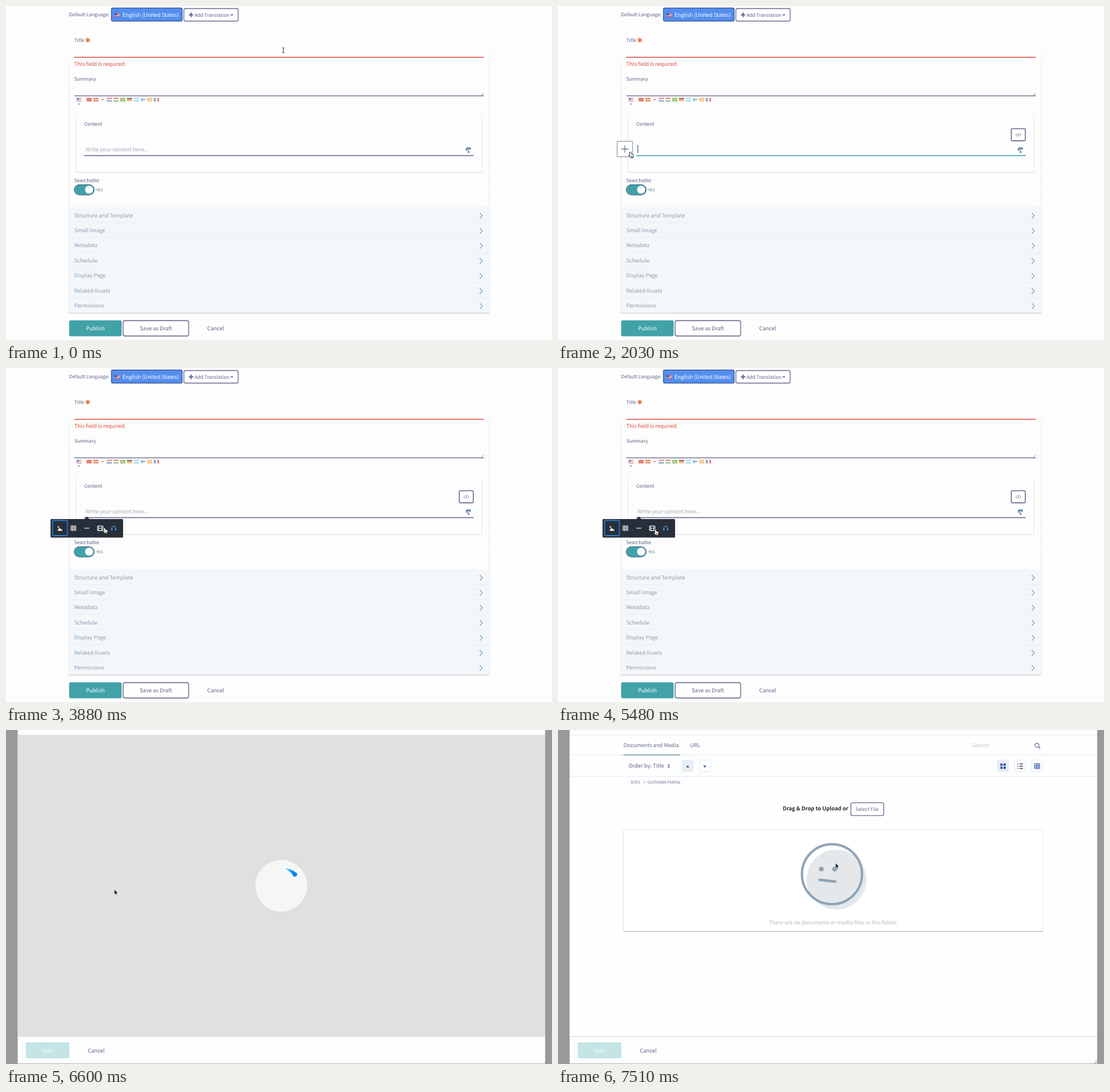
Write an HTML page that moves like this. It is 956 px wide and 586 px high and loops after 8000 ms.

```html
<!DOCTYPE html>
<html lang="en">
<head>
<meta charset="utf-8">
<title>Adding media to an article</title>
<style>
  html, body { margin: 0; width: 100%; height: 100%; overflow: hidden; background: #fdfdfe; }
  svg { display: block; width: 956px; height: 586px; }
  text {
    font-family: "Noto Sans CJK JP", "Noto Sans CJK SC", "Noto Sans CJK", "Noto Sans", sans-serif;
    text-rendering: geometricPrecision;
    white-space: pre;
  }
</style>
</head>
<body>
<svg id="stage" viewBox="0 0 956 586" fill="none"></svg>
<script>
const LOOP = 8000;
const BODY = 9.4, LABEL = 8.4;
const INK = '#5d5f85', MUTED = '#8b9dad', TEAL = '#41a2a8', BLUE = '#2f55a4';

const text = (x, y, s, fill = INK, size = BODY, extra = '') =>
  `<text x="${x}" y="${y}" font-size="${size}" fill="${fill}" ${extra}>${s}</text>`;
const centered = (x, y, s, fill, size) => text(x, y, s, fill, size, 'text-anchor="middle"');
const rect = (x, y, w, h, fill, stroke = 'none', rx = 0, sw = 1.3) =>
  `<rect x="${x}" y="${y}" width="${w}" height="${h}" fill="${fill}" stroke="${stroke}" stroke-width="${sw}" rx="${rx}"/>`;
const circle = (x, y, r, fill, extra = '') => `<circle cx="${x}" cy="${y}" r="${r}" fill="${fill}" ${extra}/>`;
const line = (d, stroke, sw = 1.3, extra = '') => `<path d="${d}" stroke="${stroke}" stroke-width="${sw}" ${extra}/>`;
const shape = (d, fill = 'currentColor') => `<path d="${d}" fill="${fill}"/>`;
const group = (id, content, extra = '') => `<g id="${id}" ${extra}>${content}</g>`;

// Flags: bands of colour, horizontal unless marked vertical.
function flag(x, y, colors, vertical) {
  const n = colors.length;
  return colors.map((c, i) => vertical
    ? rect(x + 9 * i / n, y, 9 / n, 6.5, c)
    : rect(x, y + 6.5 * i / n, 9, 6.5 / n, c)).join('');
}
const usFlag = (x, y) => flag(x, y, ['#d8424a', '#fff', '#d8424a', '#fff', '#d8424a']) + rect(x, y, 4.5, 3.8, '#3c5a9c');

function languageFlags() {
  const red = '#df3d30', yellow = '#f2bd36', blue = '#3568ac', sky = '#61bce8';
  const bands = [[red], [red, yellow, red], ['#fff'], [red, '#fff', blue], [red, '#fff', '#52a350'],
    ['#59aa3c'], ['#454545', red, yellow], [sky, '#fff', sky], ['#fff'], ['#f2a748', '#f5ba60', '#f2a748'],
    [blue, '#fff', red]];
  const row = bands.map((b, i) => flag(141 + 11.8 * i, 161, b, i === 10)).join('');
  return `<g opacity=".65">${usFlag(123.5, 161)}${row}
    ${circle(169.2, 164.2, 1.5, red)}${circle(204.5, 164.2, 1.9, yellow)}
    ${line('M235.5 164.2h9M238.5 161v6.5', blue, 1.5)}</g>${circle(127.5, 172, 1.3, '#319fd2')}`;
}

function accordion() {
  const titles = ['Structure and Template', 'Small Image', 'Metadata', 'Schedule',
    'Display Page', 'Related Assets', 'Permissions'];
  return rect(111, 353, 735, 185.5, '#f3f7fa') + titles.map((title, i) => {
    const y = 367 + 26.4 * i;
    return text(119.5, y + 3.5, title, MUTED)
      + line(`M829.5 ${y - 4}l4.5 5-4.5 5`, MUTED, 1.3)
      + (i ? line(`M111 ${y - 13.5}h735`, '#e9eef2', 1) : '');
  }).join('');
}

const form = `
  <defs><linearGradient id="edge" x2="0" y2="1"><stop stop-color="#e4e4ea" stop-opacity="0"/>
  <stop offset=".25" stop-color="#e4e4ea"/></linearGradient></defs>
  ${rect(0, 0, 956, 586, '#fdfdfe')}
  ${text(110.5, 18.3, 'Default Language:', INK, LABEL)}
  ${rect(184.5, 3.5, 124, 23, '#548eee', '#3d5c9c', 2.5)}${usFlag(190, 12.5)}
  ${text(204, 19, 'English (United States)', '#fff')}
  ${rect(311.5, 4.5, 95, 22, '#fff', '#66688f', 2.5)}
  ${line('M320 15.5h8M324 11.5v8', INK, 2)}
  ${text(330, 19, 'Add Translation', INK, LABEL)}${shape('M393 14.5h5l-2.5 3z', INK)}
  ${rect(110, 44, 1, 495, 'url(#edge)')}${rect(845.5, 44, 1, 495, 'url(#edge)')}
  ${text(119.5, 62.8, 'Title', INK, LABEL)}
  ${line('M143.2 55.8v8M139.7 57.8l7 4M139.7 61.8l7-4', '#e9733b', 2)}
  ${line('M119.5 90h717', '#df4a37', 1.4)}
  ${text(119.5, 104.6, 'This field is required.', '#df4a37')}
  ${text(119.5, 131, 'Summary', INK, LABEL)}
  ${line('M119.5 157.7h717', INK)}${line('M831.5 157l4.5-4.5M834 157l2-2', '#777', .7)}
  ${languageFlags()}
  ${rect(122.5, 180, 1, 112, 'url(#edge)')}${rect(833, 180, 1, 112, 'url(#edge)')}
  ${line('M123 292h710.5', '#d3d4da', 1.2)}
  ${text(137, 210.3, 'Content', INK, LABEL)}
  ${text(139.3, 255.4, 'Write your content here...', '#a5a7ba', BODY, 'id="placeholder"')}
  ${line('M137 262.5h682', INK, 1.4, 'id="underline"')}
  ${shape('M806.5 248h7.5v4h-7.5zM805 249h2v4h3.500v1.500h1v3.500h-3v-3.500h1v-.5h-4.500z', '#7891aa')}
  ${line('M139.8 244v14', '#333', 1, 'id="caret"')}
  ${text(119.5, 308.6, 'Searchable', INK, LABEL)}
  ${rect(119.5, 313.5, 35, 18, TEAL, '#557f94', 9)}${circle(145.5, 322.3, 7, '#fff')}
  ${text(158, 325, 'YES', INK, 6.6)}
  ${accordion()}
  ${line('M110.5 538.8h735.5', '#c9ccd2', 1.2)}
  ${rect(110.5, 551.500, 92, 28, TEAL, 'none', 3)}${centered(156.5, 569, 'Publish', '#fff')}
  ${rect(205.2, 552, 114.6, 27, '#fff', INK, 3)}${centered(262.5, 569, 'Save as Draft')}
  ${centered(367, 569, 'Cancel')}`;

const plusButton = rect(103.5, 237.5, 27, 27, '#fff', '#98a2b3', 1) + line('M110.5 251h13M117 244.500v13', '#64788e');
const codeButton = rect(793.6, 215.3, 24.6, 21.2, '#fff', '#4c4d78', 1.5)
  + line('M804 223.500l-2.500 2.500 2.500 2.500M808 223.500l2.500 2.500-2.500 2.500M806.700 223l-1.400 6', INK, .9);

const icons = [
  shape('M90 285.500l3.500-5.500 2 3 1-1 2.700 3.500z') + circle(91.7, 278.7, 1.3, 'currentColor'),
  rect(113.8, 277, 8.4, 8, 'none', 'currentColor', 0, 1) + line('M114 279.700h8M114 282.400h8M116.600 277v8M119.400 277v8', 'currentColor', .9),
  line('M137.300 281h8.500', 'currentColor', 1.2),
  rect(160.3, 277, 9.6, 8.4, 'none', 'currentColor', 1, 1.1) + line('M162.700 277v8.400M167.500 277v8.400M162.700 281.200h4.800M160.500 279.800h2M160.500 282.600h2M167.500 279.800h2M167.500 282.600h2', 'currentColor', .9),
  line('M185 282.500v-1a3.600 3.800 0 0 1 7.200 0v1', 'currentColor', 1.2) + line('M185.300 281.500v3.500M191.900 281.500v3.500', 'currentColor', 2.2),
];
const toolbar = shape('M137 265.500l4.700-5 4.700 5z', '#272f3a')
  + rect(78, 265, 127, 32.5, '#272f3a', 'none', 1.5)
  + rect(81.5, 267.5, 26, 26.5, 'none', '#3277bd', 1.5, 1.8).replace('<rect', '<rect id="focus"')
  + icons.map((icon, i) => group('icon' + i, icon)).join('');

const modalFrame = `
  ${rect(0, 0, 956, 586, '#999')}
  ${rect(20.5, 0, 923.5, 585.2, '#fcfefe')}
  ${rect(20.5, 9, 923.5, 528.5, '#f4f8f9').replace('<rect', '<rect id="body"')}
  ${line('M20.500 8.800h923.500', '#e3e6e8', 1)}${line('M20.500 537.500h923.500', '#d5d9dc', 1)}
  ${rect(34.5, 548, 76.5, 28, '#c5e4e4', 'none', 3)}${centered(72.8, 565.5, 'Add', '#f1fafa')}
  ${centered(158, 565.5, 'Cancel')}`;

const tail = [[0, 3.9], [10.4, 3.1], [19.5, 2.2], [27, 1.5], [33, 1]];
const spinner = circle(482, 273.3, 45.3, '#f5f7f7') + group('dots', tail.map(([angle, r], i) =>
  circle(482, 242.3, r, `hsl(${211 - 4 * i} 100% 51%)`, `transform="rotate(${-angle} 482 273.3)"`)).join(''));

const roundButton = (x, active) => rect(x, 53, 20, 20, active ? '#e8edf5' : '#fff', active ? '#e8edf5' : '#e4e6ef', 3, 1);
const library = `
  ${text(114.5, 30.3, 'Documents and Media', '#66698f')}${text(231, 30.3, 'URL', '#66698f')}
  ${text(724.7, 30.3, 'Search', '#c3c6cf')}
  ${line('M20.500 43.500h923.500M20.500 81.500h923.500', '#e6e9ec', 1)}
  ${line('M114.500 43.700h99', '#4c8791', 1.2)}
  ${text(123.5, 66.2, 'Order by: Title')}
  ${text(127, 94.3, 'SITES', INK, 6.3)}${line('M149.500 88l3 3-3 3', MUTED, .8)}
  ${text(157, 94.3, 'CUSTOMER PORTAL', INK, 6.3)}
  ${text(393.5, 141.2, 'Drag &amp; Drop to Upload or', '#262733', BODY, 'font-weight="700"')}
  ${rect(512.8, 127.6, 57.6, 22.6, '#fff', '#66688f', 3)}${centered(541.3, 142.3, 'Select File', '#66698f', 8.5)}
  ${group('tools', `
    ${shape('M191.700 62.200h4.600l-2.300-2.500zM191.700 64h4.600l-2.300 2.500z', INK)}
    ${roundButton(217, true)}${shape('M224 65.500h6l-3-3.500z', BLUE)}
    ${roundButton(247)}${shape('M254 62.500h6l-3 3.500z', BLUE)}
    ${roundButton(769, true)}${shape('M774.500 58.800h4v4h-4zM780 58.800h4v4h-4zM774.500 64.200h4v4h-4zM780 64.200h4v4h-4z', BLUE)}
    ${roundButton(799)}${line('M804.500 59.500h1.500M808 59.500h6M804.500 63.500h1.500M808 63.500h6M804.500 67.500h1.500M808 67.500h6', '#3c4068', 1.3)}
    ${roundButton(829)}${rect(834.6, 59, 8.8, 8.8, 'none', BLUE, 0, 1)}${line('M834.600 62h9M834.600 65h9M837.500 59v9M840.500 59v9', BLUE, 1)}
    ${line('M938.500 585l5-5M941 585l2.500-2.500', '#777', .8)}`)}
  ${group('searchIcon', circle(838.6, 26.9, 3.6, 'none', `stroke="${INK}" stroke-width="1.200"`) + line('M841.200 29.500l3 3', INK, 1.4))}
  ${group('card', `
    ${rect(114.5, 174.5, 735, 179, '#fff', '#e5e7eb', 1, 1)}${line('M114.500 353.300h735', '#b5b8c0', 1.2)}
    ${circle(487.5, 262.5, 52.5, '#e4e8ea')}
    ${circle(479.7, 253, 52.6, 'none', 'stroke="#8fa4b6" stroke-width="4.200"')}
    ${circle(461, 244, 4.3, '#8fa4b6')}${circle(484.5, 244, 4.3, '#8fa4b6')}
    ${line('M458.300 262.800l27 3.200', '#8fa4b6', 4.7, 'stroke-linecap="round"')}
    ${centered(482, 341.2, 'There are no documents or media files in this folder.', '#b1b7c2')}`)}`;

const pointers = {
  beam: line('M-2-4.500q2 0 2 1.500v6q0 1.500-2 1.500M2-4.500q-2 0-2 1.500M2 4.500q-2 0-2-1.500', '#222', .9),
  hand: `<path d="M-2-4.500q1.200-.9 1.800.3l.7 2.600 2.700.6q1.300.5 1.100 2l-.8 4.300h-4.300l-3.300-3.600q-.3-1.500 1.200-1l.9.5-1.200-4.300q-.1-1 1.200-1.400zM0 2v2M1.700 2v2" fill="#fff" stroke="#111" stroke-width=".9"/>`,
  arrow: '<path d="M0 0v8.500l2-1.700 1.400 3 1.400-.6-1.300-2.900h2.600z" fill="#111" stroke="#fff" stroke-width=".5"/>',
};

const $ = id => document.getElementById(id);
$('stage').innerHTML = group('form', form + group('plus', plusButton) + group('code', codeButton) + group('toolbar', toolbar))
  + group('modal', modalFrame + group('spinner', spinner) + group('library', library))
  + group('cursor', Object.entries(pointers).map(([id, art]) => group(id, art)).join(''));

const show = (id, on) => $(id).setAttribute('display', on ? 'inline' : 'none');

// The picture refreshes in bursts: [start, end, steps].
const bursts = [[0, 0, 1], [110, 110, 1], [320, 960, 11], [1110, 1110, 1], [1280, 1280, 1], [1460, 2030, 10],
  [2320, 2610, 4], [2970, 3770, 14], [3830, 4630, 14], [4690, 5480, 15], [5540, 5590, 2], [5770, 6060, 5],
  [6300, 6390, 2], [6600, 6600, 1], [6770, 6770, 1], [6950, 6950, 1], [7160, 7160, 1], [7340, 7340, 1], [7510, 7510, 1]];
function snap(t) {
  const [start, end, steps] = bursts.findLast(b => b[0] <= t);
  const gap = (end - start) / (steps - 1) || 1;
  return start + gap * Math.min(steps - 1, Math.floor((t - start + 12) / gap));
}

// Pointer path: time, x, y.
const path = [[0, 485.5, 77.7], [110, 485.2, 77.5], [260, 485, 77.5], [600, 370, 165], [960, 237, 254.5], [1400, 237, 254.5],
  [1750, 175, 262], [2030, 128, 261], [2900, 128, 261], [3220, 95, 283], [3600, 168, 286], [3770, 181, 286],
  [3890, 174, 285], [4180, 141, 284], [4600, 193, 287], [4700, 193, 287], [4980, 160, 288], [5340, 191, 285],
  [5480, 172, 288], [5590, 165, 288], [5770, 187, 288], [6060, 186, 288], [6390, 186, 288], [6600, 189.8, 280],
  [6770, 194, 279], [6950, 300, 270], [7160, 424.5, 258.5], [7340, 479.5, 235], [7510, 486, 233.6]];
function pointerAt(t) {
  const i = path.findIndex(p => p[0] > t);
  if (i < 0) return path.at(-1).slice(1);
  const [a, b] = [path[i - 1], path[i]];
  const k = (t - a[0]) / (b[0] - a[0]);
  return [a[1] + (b[1] - a[1]) * k, a[2] + (b[2] - a[2]) * k];
}

function pointerKind(t, x, y) {
  if (t >= 6600) return 'arrow';
  if (t > 2900 || (t > 1460 && x < 134)) return 'hand';
  return y < 92 || y > 236 ? 'beam' : 'arrow';
}

function draw(t) {
  const menu = t >= 2400, focused = t >= 1110 && !menu;
  show('form', t < 6300);
  show('placeholder', !focused);
  show('caret', focused && !(t > 1600 && t < 2000));
  $('underline').setAttribute('stroke', focused ? '#2f9a9f' : INK);
  show('plus', t >= 955 && !menu);
  $('plus').setAttribute('opacity', focused ? 1 : .5);
  show('code', t >= 1280);
  show('toolbar', menu);
  $('focus').setAttribute('x', t < 5770 ? 81.5 : 175.5);
  const [hx, hy] = pointerAt(Math.max(0, t - 100));
  const hovered = hy > 270 ? Math.round((hx - 95.5) / 23.5) : -1;
  icons.forEach((_, i) => $('icon' + i).setAttribute('color', i === hovered ? '#4a9be6' : '#fff'));

  show('modal', t >= 6300);
  $('body').setAttribute('fill', t < 6390 ? '#f4f8f9' : t < 6770 ? '#dfe1e1' : '#fdfefe');
  show('spinner', t >= 6390 && t < 6770);
  $('dots').setAttribute('transform', `rotate(${50 + (t - 6600) * .25} 482 273.3)`);
  show('library', t >= 6770);
  show('tools', t >= 6950);
  show('searchIcon', t >= 7160);
  $('card').setAttribute('transform', `translate(0 ${t < 7160 ? 10 : 0})`);

  const [x, y] = pointerAt(t), kind = pointerKind(t, x, y);
  $('cursor').setAttribute('transform', `translate(${x} ${y})`);
  for (const id in pointers) show(id, id === kind);
}

const begin = performance.now();
function tick() {
  draw(snap((performance.now() - begin) % LOOP));
  requestAnimationFrame(tick);
}
tick();
</script>
</body>
</html>
```
